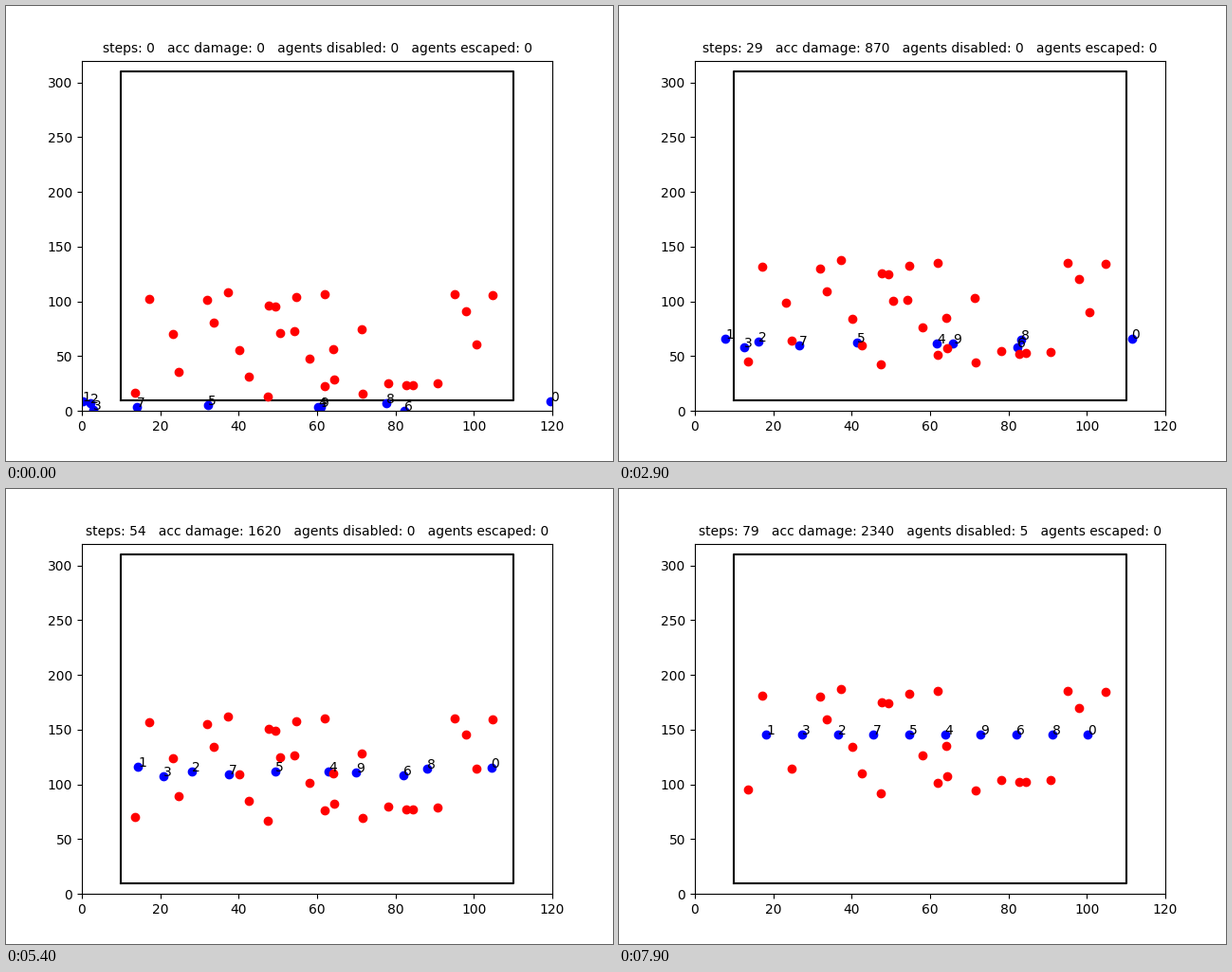
Animation, 640 px wide and 480 px high, one loop 8 s. Source, as a matplotlib script:

```python
import numpy as np
import matplotlib.pyplot as plt
from matplotlib.animation import FuncAnimation

STEPS = 80
SPEED = 2.0       # blue units per step; red ones climb 1 per step
LINE_Y = 145.5    # height of the final blue line
FORMED = 73       # step at which the line starts catching
REACH = 7.3

red = np.array([
    (13.6, 16.5), (17.2, 102.5), (23.3, 70), (24.7, 35.5), (32, 101.3),
    (33.6, 80.5), (37.3, 108.5), (40.2, 55.5), (42.6, 31.2), (47.4, 13.2),
    (47.7, 96.4), (49.4, 95.5), (50.6, 71.2), (54.2, 72.8), (54.7, 104),
    (58.1, 47.6), (62, 106.6), (62, 22.6), (64.1, 56.4), (64.4, 28.5),
    (71.4, 74.4), (71.7, 15.7), (78.2, 25.4), (82.8, 23.5), (84.5, 23.6),
    (90.8, 25.2), (95.1, 106.5), (98, 91.2), (100.7, 60.8), (104.8, 105.7),
])
start = np.array([
    (119.55, 8.7), (0.2, 8.7), (2.2, 7), (2.9, 0.9), (60.25, 3.6),
    (32.2, 5.3), (82.3, 0.1), (14.1, 3.6), (77.7, 7), (60.85, 3.5),
])
order = [1, 3, 2, 7, 5, 4, 9, 6, 8, 0]   # labels from left to right
post = np.full((10, 2), LINE_Y)
post[order, 0] = np.linspace(18.2, 100.2, 10)
path = post - start
length = np.hypot(*path.T)


def blue_at(step):
    part = np.minimum(1, SPEED * step / length)
    return start + path * part[:, None]


def red_at(step):
    return red + (0, step)


def run():
    """Which red dots are active, and the damage total, at every step."""
    active = np.ones((STEPS, len(red)), bool)
    for s in range(1, STEPS):
        active[s] = active[s - 1]
        if s >= FORMED:
            gap = red_at(s)[:, None] - post
            active[s] &= np.hypot(gap[..., 0], gap[..., 1]).min(axis=1) > REACH
    damage = active.sum(axis=1)
    damage[0] = 0
    return active, damage.cumsum()


active, damage = run()

fig, ax = plt.subplots(figsize=(6.4, 4.8), dpi=100)
ax.set_xlim(0, 120)
ax.set_ylim(0, 320)
ax.plot([10, 110, 110, 10, 10], [10, 10, 310, 310, 10], color="black")
blue_dots, = ax.plot([], [], "o", color="blue")
red_dots, = ax.plot([], [], "o", color="red")
labels = [ax.text(0, 0, str(i)) for i in range(10)]
title = ax.set_title("", fontsize=10)


def update(step):
    pos = blue_at(step)
    blue_dots.set_data(*pos.T)
    red_dots.set_data(*red_at(step)[active[step]].T)
    for label, p in zip(labels, pos):
        label.set_position(p)
    title.set_text(f"steps: {step}   acc damage: {damage[step]}   "
                   f"agents disabled: {np.sum(~active[step])}   "
                   "agents escaped: 0")
    return blue_dots, red_dots, title, *labels


anim = FuncAnimation(fig, update, frames=STEPS, interval=100,
                     init_func=lambda: update(0), repeat=True, repeat_delay=0)
plt.show()
```
